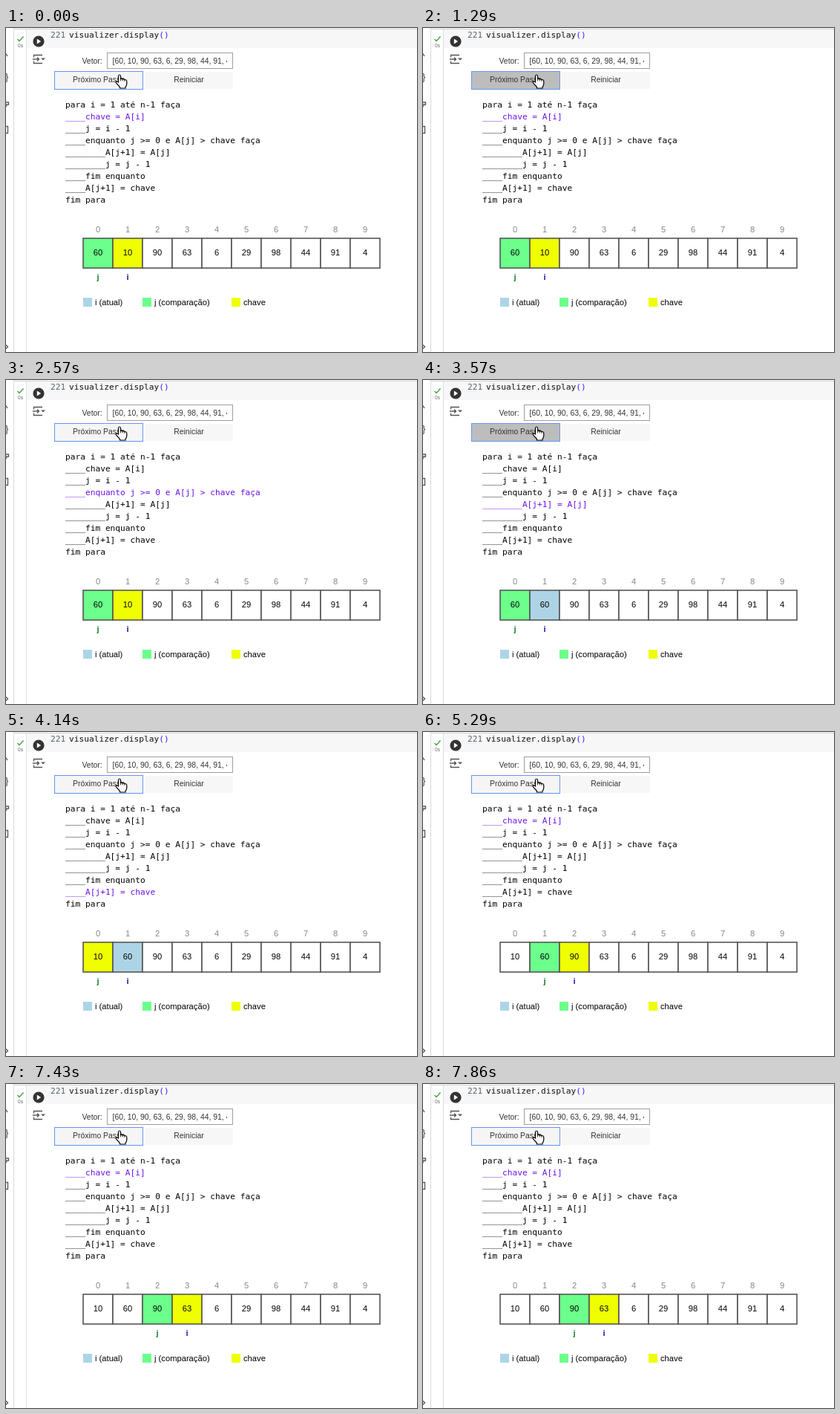
An HTML page for the animation above (8 s loop, 554 px wide and 436 px high).

```html
<!DOCTYPE html>
<html lang="pt">
<head>
<meta charset="utf-8">
<style>
  html, body { margin: 0; width: 100%; height: 100%; overflow: hidden; background: #fff; }
  svg { display: block; width: 554px; height: 436px; }
  text { font: 11.2px "Liberation Sans", Arial, sans-serif; white-space: pre; }
  .mono { font-family: "DejaVu Sans Mono", monospace; }
  .ui { font-size: 10.4px; fill: #333; }
  .mid { text-anchor: middle; }
  .head { fill: #80868c; }
  .ptr { font-weight: bold; text-anchor: middle; }
  .line { fill: none; stroke: #555; stroke-width: 1.3; }
  .cell { stroke: #555; stroke-width: 1.6; }
</style>
</head>
<body>
<svg id="stage" viewBox="0 0 554 436">
  <!-- notebook frame -->
  <rect x="28" y="2" width="526" height="25" fill="#f7f7f7"/>
  <rect x="11" y="1" width="543" height="1" fill="#d0d0d0"/>
  <rect x="10" width="1" height="436" fill="#d8dadc"/>
  <rect x="27" y="2" width="1" height="434" fill="#dedede"/>
  <g class="line">
    <path d="M0 34.5l2 3.500M0 100h3.500v3h-3.500M0 105h1.500M-5 132.500h7.500v9h-7.500M0 426.500l2.500 2.500-2.500 2.500"/>
    <path d="M37.500 39.500v-3h11.500M37.500 44.500v3h11.500M36 42h8.500M42 39.500l2.500 2.500-2.500 2.500"/>
  </g>
  <text x="-1" y="70" style="font-size:13px" fill="#444">}</text>
  <path d="M15.500 15l2.500 2.500 5.500-6" fill="none" stroke="#3aa845" stroke-width="1.400"/>
  <text class="mid" x="19.500" y="25.500" style="font-size:6.500px" fill="#666">0s</text>
  <circle cx="44" cy="18" r="7.600" fill="#333"/>
  <path d="M41.800 14.500v7l5.400-3.500z" fill="#fff"/>
  <path d="M47 40.500h6l-3 3z" fill="#555"/>
  <text class="mono" x="60" y="13" fill="#5a666e">221</text>
  <text class="mono" x="85" y="13" fill="#111">visualizer.display<tspan fill="#4421f5">()</tspan></text>

  <!-- controls -->
  <clipPath id="clip"><rect x="137" y="35" width="161" height="19"/></clipPath>
  <text class="ui" x="102.500" y="48">Vetor:</text>
  <rect x="136.500" y="33.500" width="169" height="21" fill="#fff" stroke="#9e9e9e"/>
  <text class="ui" x="143.500" y="48" clip-path="url(#clip)">[60, 10, 90, 63, 6, 29, 98, 44, 91, 4]</text>
  <rect id="button" x="65.500" y="58.500" width="119" height="24" stroke="#6497ee"/>
  <rect x="187" y="59" width="119" height="23" fill="#f7f7f7"/>
  <text class="ui mid" x="125" y="73">Próximo Passo</text>
  <text class="ui mid" x="246.500" y="73">Reiniciar</text>

  <g id="code"></g>
  <g id="array"></g>
  <g id="legend"></g>

  <path d="M151.500 65Q151.500 63 153 63T154.600 65V68.600Q156 67.600 157.200 69 158.800 68.200 159.800 69.600 162.600 69 162.800 72V75Q162.600 77.500 161 79.500V81H153.500V79.500L148.500 74Q147.500 72 149.300 71.600L151.500 73Z"
    fill="#fff" stroke="#000" stroke-width="1.200"/>
  <path d="M154.600 68.500v3M157.300 69v2.500M159.900 69.700v2.300" stroke="#000" stroke-width=".8"/>
</svg>
<script>
const $ = id => document.getElementById(id);
const BLUE = '#add4e6', GREEN = '#6cff8c', YELLOW = '#f0ff00';
const code = ['para i = 1 até n-1 faça', '____chave = A[i]', '____j = i - 1',
  '____enquanto j >= 0 e A[j] > chave faça', '________A[j+1] = A[j]',
  '________j = j - 1', '____fim enquanto', '____A[j+1] = chave', 'fim para'];
const rest = [90, 63, 6, 29, 98, 44, 91, 4];

const steps = [
  { at: 0,    line: 1, i: 1, j: 0, key: 1,  first: [60, 10] },
  { at: 2000, line: 3, i: 1, j: 0, key: 1,  first: [60, 10] },
  { at: 3140, line: 4, i: 1, j: 0, key: -1, first: [60, 60] },
  { at: 4140, line: 7, i: 1, j: 0, key: 0,  first: [10, 60] },
  { at: 5290, line: 1, i: 2, j: 1, key: 2,  first: [10, 60] },
  { at: 6290, line: 7, i: 2, j: 2, key: 2,  first: [10, 60] },
  { at: 7430, line: 1, i: 3, j: 2, key: 3,  first: [10, 60] }
];
const presses = [[1290, 1430], [2430, 2570], [3570, 3710], [4570, 4710],
  [5570, 5710], [6570, 6710], [7710, 7860]];

const label = (x, y, str, cls = '', fill = '#000') =>
  `<text x="${x}" y="${y}" class="${cls}" fill="${fill}">${str.toString().replace(/>/g, '&gt;')}</text>`;

$('legend').innerHTML = [[104, BLUE, 'i (atual)'], [184, GREEN, 'j (comparação)'], [304, YELLOW, 'chave']]
  .map(([x, color, name]) =>
    `<rect x="${x}" y="363" width="12" height="12" fill="${color}"/>` + label(x + 16, 373, name)).join('');

function show({ line, i, j, key, first }) {
  $('code').innerHTML = code.map((str, k) =>
    label(80, 107 + 16 * k, str, 'mono', k === line ? '#6a10ea' : '#000')).join('');
  const center = k => 124 + 40 * k;
  $('array').innerHTML = [...first, ...rest].map((value, k) => {
    const fill = k === key ? YELLOW : k === j ? GREEN : k === i ? BLUE : '#fff';
    return `<rect class="cell" x="${104 + 40 * k}" y="283" width="40" height="40" fill="${fill}"/>`
      + label(center(k), 275, k, 'mid head') + label(center(k), 306, value, 'mid');
  }).join('')
    + label(center(i), 339, 'i', 'ptr', '#2a10a8') + label(center(j), 339, 'j', 'ptr', '#1f7a2f');
}

let current;
function frame(now) {
  const t = now % 8000;
  const step = steps.findLast(s => s.at <= t);
  if (step !== current) show(current = step);
  const down = presses.some(([from, to]) => t >= from && t < to);
  $('button').setAttribute('fill', down ? '#bdbdbd' : '#f5f5f5');
  requestAnimationFrame(frame);
}
frame(performance.now());
</script>
</body>
</html>
```
